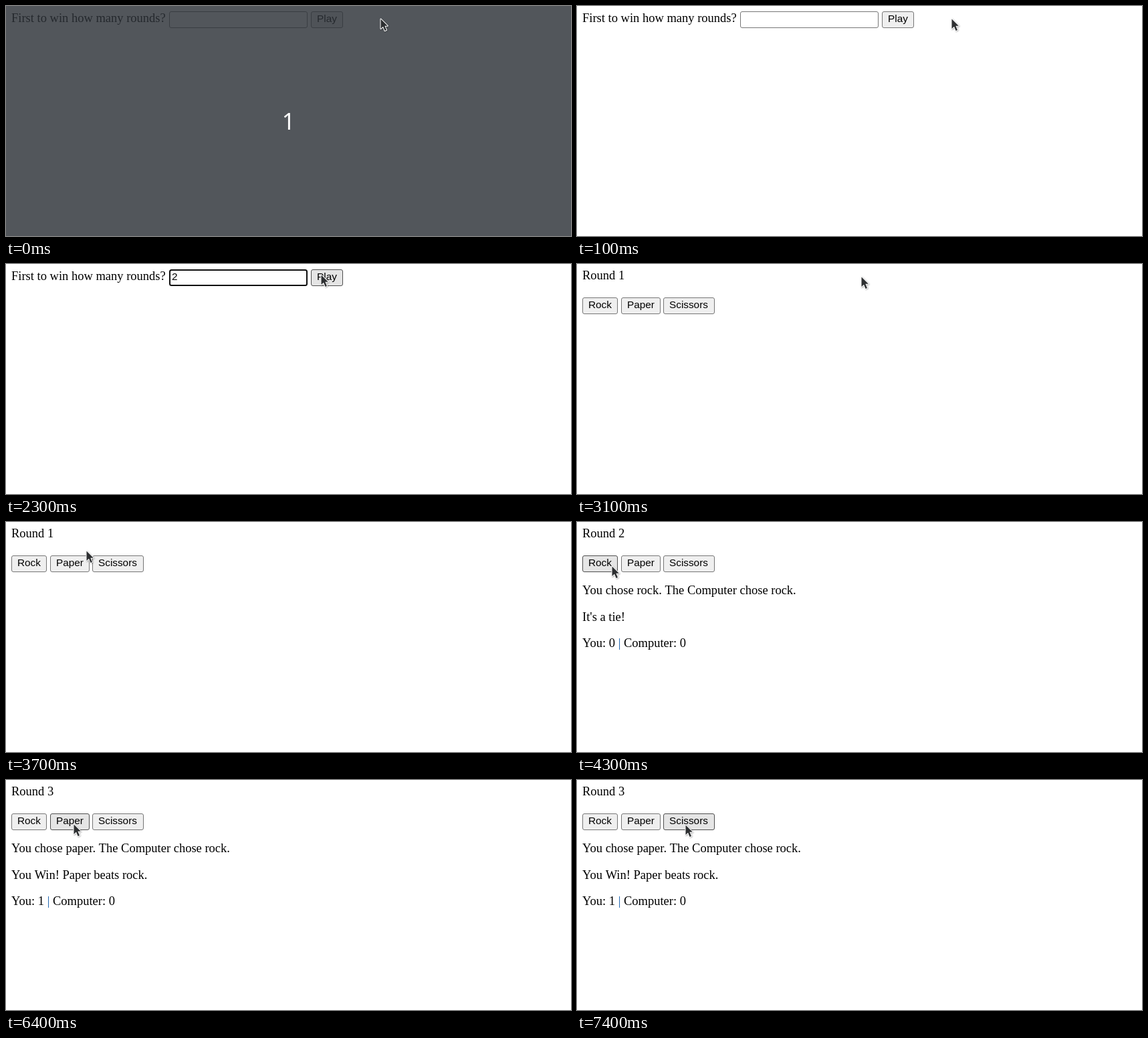
Animation of 845x344 px, one loop 8 s. Source, as an HTML page with a canvas:

```html
<!DOCTYPE html>
<html lang="en">
<head>
<meta charset="utf-8">
<title>Rock paper scissors</title>
<style>
html, body { margin: 0; width: 100%; height: 100%; overflow: hidden; background: #fff; }
canvas { display: block; }
</style>
</head>
<body>
<canvas id="stage" width="845" height="344"></canvas>
<script>
const ctx = document.getElementById('stage').getContext('2d', { alpha: false });
const LOOP = 8000, STEP = 100;
const SERIF = '18.5px "Liberation Serif", serif';
const SANS = '15.33px "Liberation Sans", sans-serif';

// Moments at which the page changes
const FOCUS = 800, TYPED = 1500, PLAY = 2700, ROUND2 = 4300, ROUND3 = 6400;

const INPUT = { x: 244, y: 8, w: 207, h: 25 };
const PLAY_BUTTON = { label: 'Play', x: 456, y: 8, w: 48, h: 25, pressed: 2600 };
const CHOICES = [
  { label: 'Rock', x: 8, y: 50, w: 53, h: 25 },
  { label: 'Paper', x: 66, y: 50, w: 59, h: 25, pressed: 6300 },
  { label: 'Scissors', x: 129, y: 50, w: 77, h: 25 }
];

// Pointer path: time, x, y
const PATH = [
  [100, 560, 18], [300, 515, 8], [500, 484, 7], [600, 484, 7], [800, 410, 20],
  [1600, 410, 20], [2000, 446, 18], [2300, 471, 15], [2700, 471, 15], [2800, 471, 17],
  [3000, 471, 17], [3400, 285, 22], [3700, 120, 42], [3900, 100, 57],
  [4100, 52, 65], [5200, 52, 65], [5300, 53, 66], [5600, 76, 66], [5900, 101, 65],
  [6600, 101, 65], [6800, 110, 63], [6900, 110, 63], [7400, 162, 66]
];

function pointerAt(t) {
  const next = PATH.findIndex(key => key[0] > t);
  if (next < 1) {
    const [, x, y] = next === 0 ? PATH[0] : PATH[PATH.length - 1];
    return { x, y };
  }
  const [t0, x0, y0] = PATH[next - 1], [t1, x1, y1] = PATH[next];
  const k = (t - t0) / (t1 - t0);
  return { x: Math.round(x0 + (x1 - x0) * k), y: Math.round(y0 + (y1 - y0) * k) };
}

const inside = (p, b) => p.x >= b.x && p.x < b.x + b.w && p.y >= b.y && p.y < b.y + b.h;

function text(str, x, baseline, font = SERIF, color = '#000') {
  ctx.font = font;
  ctx.fillStyle = color;
  ctx.fillText(str, x, baseline);
  return x + ctx.measureText(str).width;
}

function box(b, fill, stroke, line = 1) {
  ctx.beginPath();
  ctx.roundRect(b.x + line / 2, b.y + line / 2, b.w - line, b.h - line, 2.5);
  ctx.fillStyle = fill;
  ctx.fill();
  ctx.strokeStyle = stroke;
  ctx.lineWidth = line;
  ctx.stroke();
}

function button(b, t, pointer) {
  if (t === b.pressed) box(b, '#f5f5f5', '#8d8d8d');
  else if (inside(pointer, b)) box(b, '#e5e5e5', '#4f4f4f');
  else box(b, '#efefef', '#767676');
  text(b.label, b.x + 9, b.y + 16, SANS);
}

function drawForm(t, pointer) {
  text('First to win how many rounds?', 8, 24);
  const focused = t >= FOCUS, typed = t >= TYPED;
  box(INPUT, '#fff', focused ? '#101010' : '#767676', focused ? 2 : 1);
  if (typed) text('2', 248, 24, SANS);
  const caretOn = focused && (t - (typed ? TYPED : FOCUS)) % 1000 < 500 && t < 2300;
  if (caretOn) {
    ctx.fillStyle = '#000';
    ctx.fillRect(typed ? 256 : 248, 12, 1, 17);
  }
  button(PLAY_BUTTON, t, pointer);
}

function drawGame(t, pointer) {
  const round = t >= ROUND3 ? 3 : t >= ROUND2 ? 2 : 1;
  text('Round ' + round, 8, 23);
  CHOICES.forEach(b => button(b, t, pointer));
  if (round === 1) return;
  const won = round === 3;
  text(`You chose ${won ? 'paper' : 'rock'}. The Computer chose rock.`, 8, 108);
  text(won ? 'You Win! Paper beats rock.' : "It's a tie!", 8, 148);
  let x = text(`You: ${won ? 1 : 0} `, 8, 187);
  x = text('|', x, 187, SERIF, '#0a58a8');
  text(' Computer: 0', x, 187);
}

function drawCountdown() {
  ctx.fillStyle = 'rgba(45, 49, 55, .82)';
  ctx.fillRect(0, 0, 845, 344);
  ctx.textAlign = 'center';
  text('1', 422.5, 185, '34px "Noto Sans", "Open Sans", sans-serif', '#fff');
  ctx.textAlign = 'left';
}

function drawArrow({ x, y }) {
  const shape = new Path2D('M.5 1.5V16L4 12.7L6.6 19L9 18L6.4 11.8H10.8Z');
  ctx.save();
  ctx.translate(x, y);
  ctx.lineJoin = 'round';
  ctx.shadowColor = 'rgba(0, 0, 0, .35)';
  ctx.shadowBlur = 2;
  ctx.shadowOffsetX = ctx.shadowOffsetY = .7;
  ctx.strokeStyle = '#fff';
  ctx.lineWidth = 2;
  ctx.stroke(shape);
  ctx.shadowColor = 'transparent';
  ctx.fillStyle = '#2d2f31';
  ctx.fill(shape);
  ctx.restore();
}

function drawBeam({ x, y }) {
  const shape = new Path2D('M-3 -7.5H-1L.5 -6.5L2 -7.5H4M.5 -6.5V6.5M-3 7.5H-1L.5 6.5L2 7.5H4');
  ctx.save();
  ctx.translate(x, y);
  for (const [color, width] of [['#fff', 3], ['#222', 1]]) {
    ctx.strokeStyle = color;
    ctx.lineWidth = width;
    ctx.stroke(shape);
  }
  ctx.restore();
}

function draw(now) {
  const t = Math.floor(now % LOOP / STEP) * STEP;
  const pointer = pointerAt(t);
  ctx.fillStyle = '#fff';
  ctx.fillRect(0, 0, 845, 344);
  if (t < PLAY) drawForm(t, pointer);
  else drawGame(t, pointer);
  if (t < 100) drawCountdown();
  if (t < PLAY && inside(pointer, INPUT)) drawBeam(pointer);
  else drawArrow(pointer);
}

const start = performance.now();
function tick() {
  draw(performance.now() - start);
  requestAnimationFrame(tick);
}
tick();
</script>
</body>
</html>
```
